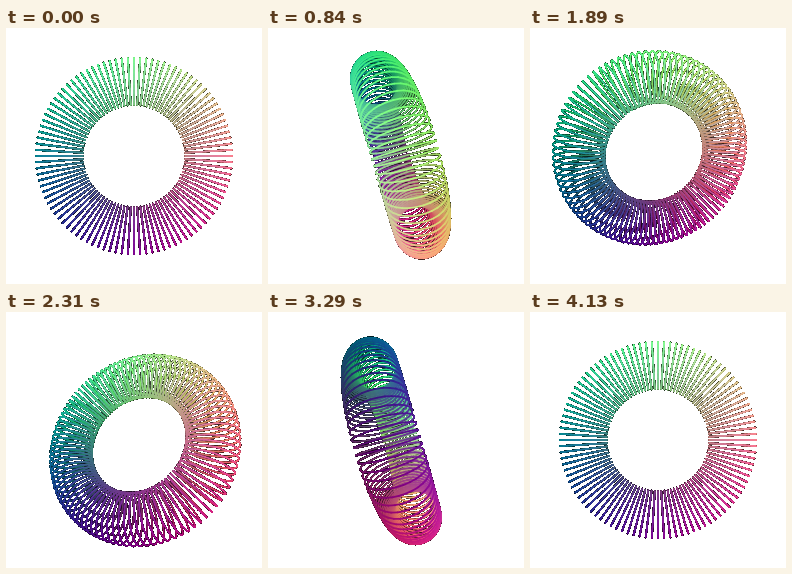
Recreate the animation shown at these times as an HTML page with a canvas. Size 256 px wide and 256 px high, loop 4.2 s.

```html
<!DOCTYPE html>
<html lang="en">
<head>
<meta charset="utf-8">
<title>Orbit around a ring of rings</title>
<style>
  html, body { margin: 0; width: 100%; height: 100%; overflow: hidden; background: #fff; }
  canvas { display: block; width: 100vmin; height: 100vmin; }
</style>
</head>
<body>
<canvas id="stage" width="256" height="256"></canvas>
<script>
const ctx = document.getElementById('stage').getContext('2d', { willReadFrequently: true });
const SIZE = 256, STEPS = 60, STEP_MS = 70;
const RINGS = 100, SIDES = 32, TUBE = 0.3, DISTANCE = 3;
const FOCAL = SIZE / 2 / Math.tan(Math.PI / 6);
const LINE_WIDTH = 1.8, MIN_COVERAGE = 0.25;
const TAU = 2 * Math.PI;

// Position inside the bounding cube gives the colour.
const colorAt = p =>
  `rgb(${p.map(v => Math.round(127.5 * (1 + v / (1 + TUBE)))).join()})`;

const rings = Array.from({ length: RINGS }, (_, i) => {
  const a = TAU * i / RINGS;
  return Array.from({ length: SIDES }, (_, j) => {
    const b = TAU * j / SIDES, r = 1 + TUBE * Math.cos(b);
    const position = [r * Math.cos(a), r * Math.sin(a), TUBE * Math.sin(b)];
    return { position, color: colorAt(position) };
  });
});

const dot = (a, b) => a[0] * b[0] + a[1] * b[1] + a[2] * b[2];

// Camera on a sphere, always upright: the view turns over at the poles.
function makeCamera(angle) {
  const s = Math.sin(angle), c = Math.cos(angle);
  const toward = [c * s, s, c * c];
  const len = Math.hypot(toward[0], toward[2]);
  const right = [toward[2] / len, 0, -toward[0] / len];
  const up = [
    toward[1] * right[2],
    toward[2] * right[0] - toward[0] * right[2],
    -toward[1] * right[0]
  ];
  return p => {
    const depth = DISTANCE - dot(p, toward), k = FOCAL / depth;
    return { x: SIZE / 2 + k * dot(p, right), y: SIZE / 2 - k * dot(p, up), depth };
  };
}

// Soft edges fade to black, and faintly covered pixels become white.
function matte() {
  const image = ctx.getImageData(0, 0, SIZE, SIZE), px = image.data;
  for (let i = 0; i < px.length; i += 4) {
    const alpha = px[i + 3] / 255;
    for (let c = i; c < i + 3; c++) px[c] = alpha < MIN_COVERAGE ? 255 : px[c] * alpha;
    px[i + 3] = 255;
  }
  ctx.putImageData(image, 0, 0);
}

function draw(step) {
  const project = makeCamera(TAU * step / (STEPS - 1));
  const strokes = rings.flatMap(ring => {
    const flat = ring.map(point => project(point.position));
    return flat.map((p, j) => {
      const q = flat[(j + 1) % SIDES];
      return { p, q, color: ring[j].color, depth: p.depth + q.depth };
    });
  });
  strokes.sort((a, b) => b.depth - a.depth);

  ctx.clearRect(0, 0, SIZE, SIZE);
  ctx.lineCap = 'round';
  ctx.lineWidth = LINE_WIDTH;
  for (const { p, q, color } of strokes) {
    ctx.strokeStyle = color;
    ctx.beginPath();
    ctx.moveTo(p.x, p.y);
    ctx.lineTo(q.x, q.y);
    ctx.stroke();
  }
  matte();
}

let shown = -1;
function tick(now) {
  const step = Math.floor(now / STEP_MS) % STEPS;
  if (step !== shown) draw(shown = step);
  requestAnimationFrame(tick);
}
draw(shown = 0);
requestAnimationFrame(tick);
</script>
</body>
</html>
```
